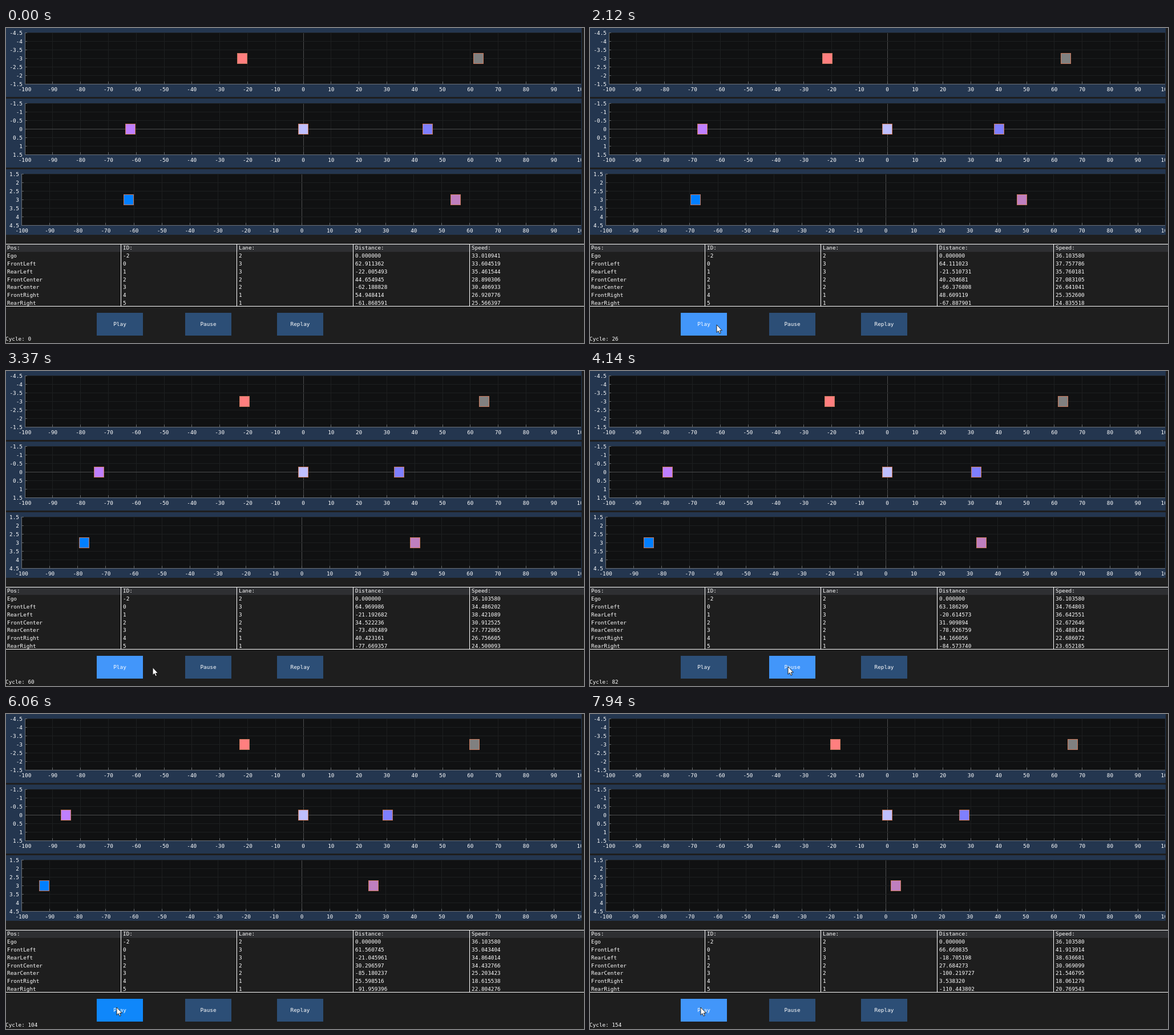
Animation of 1013 by 553 pixels, one loop 8 s. Source, as an HTML page with a canvas:

```html
<!DOCTYPE html>
<html lang="en">
<head>
<meta charset="utf-8">
<title>Lane monitor</title>
<style>
  html, body { margin: 0; width: 100%; height: 100%; overflow: hidden; background: #1e1e1e; }
  canvas { display: block; }
</style>
</head>
<body>
<canvas id="stage" width="1013" height="553"></canvas>
<script>
const ctx = document.getElementById('stage').getContext('2d');
const W = 1013, H = 553, LOOP = 8000, STEP = 70, RIGHT = 1008;

const ANCHORS = [590, 1420, 2260, 3090, 3930, 4780, 5650, 6060, 6470, 7310];

// [time, cycle]
const CYCLES = [[1180, 0], [2120, 26], [3370, 60], [4920, 104], [6190, 104], [7100, 130], [7940, 154]];

// [time, x, y]
const POINTER = [[520, 280, 560], [1000, 222, 521], [3225, 222, 521], [3640, 347, 519], [5650, 347, 519], [5950, 194, 515]];
const PRESSES = [[1050, 1190], [4780, 4900], [6060, 6190]];

const BUTTONS = [['Play', 159], ['Pause', 314], ['Replay', 475]];
const COLUMNS = [['Pos:', 2], ['ID:', 205], ['Lane:', 408], ['Distance:', 612], ['Speed:', 816]];

const PLOTS = [
  { top: 0, bottom: 121, y: 8, left: 33, zero: 521, unit: 4.88, first: -4.5 },
  { top: 124, bottom: 245, y: 132, left: 33, zero: 521, unit: 4.88, first: -1.5 },
  { top: 248, bottom: 363, y: 256, left: 27, zero: 518.5, unit: 4.908, first: 1.5 }
];

// Samples of distance and speed at these cycles
const KNOTS = [0, 26, 60, 104, 130, 154];
const CARS = [
  { pos: 'Ego', id: -2, lane: 2, color: '#bfbfff',
    dist: [0, 0, 0, 0, 0, 0],
    speed: [33.010941, 36.10358, 36.10358, 36.10358, 36.10358, 36.10358] },
  { pos: 'FrontLeft', id: 0, lane: 3, color: '#808080',
    dist: [62.911362, 64.111023, 64.969986, 61.560745, 63.367867, 66.660835],
    speed: [33.604519, 37.757786, 34.486202, 35.043404, 41.36982, 41.913914] },
  { pos: 'RearLeft', id: 1, lane: 3, color: '#ff7f7f',
    dist: [-22.005493, -21.510731, -21.192682, -21.045961, -20.264399, -18.705198],
    speed: [35.461544, 35.760181, 38.421089, 34.864014, 38.791008, 38.636681] },
  { pos: 'FrontCenter', id: 2, lane: 2, color: '#7f7fff',
    dist: [44.654945, 40.204681, 34.522236, 30.296597, 29.4676, 27.684273],
    speed: [28.890306, 27.083105, 30.912525, 34.432766, 33.948032, 30.969099] },
  { pos: 'RearCenter', id: 3, lane: 2, color: '#bf7fff',
    dist: [-62.188828, -66.376808, -73.402489, -85.180237, -92.164948, -100.219727],
    speed: [30.406933, 26.641041, 27.772865, 25.203423, 25.124304, 21.546795] },
  { pos: 'FrontRight', id: 4, lane: 1, color: '#bf7fbf',
    dist: [54.948414, 48.609119, 40.423161, 25.598516, 14.43735, 3.53832],
    speed: [26.920776, 25.3526, 26.756605, 18.615538, 18.675219, 18.06127] },
  { pos: 'RearRight', id: 5, lane: 1, color: '#007fff',
    dist: [-61.868591, -67.887901, -77.669357, -91.959396, -101.80574, -110.443802],
    speed: [25.566397, 24.835518, 24.500093, 22.804276, 21.052591, 20.769543] }
];

const lerp = (a, b, u) => a + (b - a) * u;
const smooth = u => u * u * (3 - 2 * u);

// Index of the segment holding v, and the place within it
function locate(stops, v) {
  let i = 0;
  while (i < stops.length - 2 && v >= stops[i + 1]) i++;
  const u = (v - stops[i]) / (stops[i + 1] - stops[i]);
  return [i, Math.min(1, Math.max(0, u))];
}

function snap(t) {
  let base = 0;
  for (const a of ANCHORS) if (t >= a) base = a;
  return base ? base + Math.floor((t - base) / STEP) * STEP : 0;
}

function cycleAt(t) {
  const [i, u] = locate(CYCLES.map(k => k[0]), t);
  return Math.round(lerp(CYCLES[i][1], CYCLES[i + 1][1], u));
}

function pointerAt(t) {
  const [i, u] = locate(POINTER.map(k => k[0]), t);
  const a = POINTER[i], b = POINTER[i + 1], s = smooth(u);
  return [lerp(a[1], b[1], s), lerp(a[2], b[2], s)];
}

// Distance follows the speed relative to the ego car.
function carState(car, cycle) {
  const [i, u] = locate(KNOTS, cycle), span = KNOTS[i + 1] - KNOTS[i];
  const slope = k => (car.speed[k] - CARS[0].speed[k]) * 0.0258 * span;
  const w = 1 - u;
  const dist = lerp(car.dist[i], car.dist[i + 1], smooth(u)) +
    slope(i) * u * w * w - slope(i + 1) * u * u * w;
  return { dist, speed: lerp(car.speed[i], car.speed[i + 1], u) };
}

function rect(x, y, w, h, color) {
  ctx.fillStyle = color;
  ctx.fillRect(x, y, w, h);
}

// y is the middle of the line
function text(s, x, y, align = 'left') {
  ctx.fillStyle = '#fff';
  ctx.textAlign = align;
  ctx.fillText(s, x, y + 3.4);
}

function clipTo(x, y, w, h, draw) {
  ctx.save();
  ctx.beginPath();
  ctx.rect(x, y, w, h);
  ctx.clip();
  draw();
  ctx.restore();
}

function drawPlot(p, cars) {
  const width = RIGHT - p.left, base = p.y + 90;
  const toX = d => p.zero + d * p.unit;
  rect(0, p.top, RIGHT + 1, p.bottom - p.top, '#24364f');
  rect(p.left, p.y, width, 90, '#101112');

  clipTo(0, p.top, RIGHT, p.bottom - p.top, () => {
    for (let v = -100; v <= 100; v += 10) {
      const x = Math.floor(toX(v));
      rect(x, p.y, 1, 90, v ? '#1d1f20' : '#4c4d4e');
      rect(x, base - 4, 1, 4, '#66696c');
      text(v, toX(v), p.y + 100, 'center');
    }
  });
  for (let i = 0; i <= 6; i++) {
    const v = p.first + i / 2, y = p.y + i * 15;
    rect(p.left, y, width, 1, v ? '#1d1f20' : '#4c4d4e');
    rect(p.left, y, 4, 1, '#66696c');
    text(v, p.left - 4, y + 0.5, 'right');
  }
  rect(p.left, p.y, 1, 91, '#6b7077');
  rect(p.left, base, width, 1, '#6b7077');

  clipTo(p.left, p.y, width, 90, () => {
    for (const car of cars) {
      if (car.dist < -100) continue;
      const x = Math.round(toX(car.dist) - 9), y = p.y + 36;
      rect(x, y, 18, 19, '#c9785a');
      rect(x + 1, y + 1, 16, 17, car.color);
    }
  });
}

function drawTable(cars) {
  rect(0, 380, W, 13, '#2e2f32');
  COLUMNS.forEach(([name, x], i) => {
    text(name, x, 386);
    if (i) rect(x - 4, 379, 1, 110, '#fff');
  });
  rect(0, 379, W, 1, '#fff');
  rect(0, 488, W, 1, '#fff');
  cars.forEach((car, row) => {
    const cells = [car.pos, car.id, car.lane, car.dist.toFixed(6), car.speed.toFixed(6)];
    cells.forEach((s, i) => text(s, COLUMNS[i][1], 400 + row * 13.7));
  });
}

function drawButtons(t) {
  const [px, py] = pointerAt(t - STEP);
  const pressed = PRESSES.some(([a, b]) => t >= a && t < b);
  for (const [name, x] of BUTTONS) {
    const over = px >= x && px < x + 81 && py >= 500 && py < 540;
    rect(x, 500, 81, 40, over ? (pressed ? '#0f87fa' : '#4296fa') : '#2c4e76');
    text(name, x + 40.5, 520, 'center');
  }
}

function drawPointer(t) {
  const [x, y] = pointerAt(t);
  ctx.save();
  ctx.translate(x, y);
  const arrow = new Path2D('M0 0V13.5L3 10.7L5 15.3L7.2 14.4L5.3 10H9.4Z');
  ctx.fillStyle = '#fff';
  ctx.fill(arrow);
  ctx.strokeStyle = '#111';
  ctx.lineWidth = 0.9;
  ctx.stroke(arrow);
  ctx.restore();
}

function draw(time) {
  const t = snap(time), cycle = cycleAt(t);
  const cars = CARS.map(car => ({ ...car, ...carState(car, cycle) }));
  ctx.font = '9.37px "DejaVu Sans Mono", monospace';
  rect(0, 0, W, H, '#1e1e1e');
  PLOTS.forEach((p, i) => drawPlot(p, cars.filter(car => car.lane === 3 - i)));
  drawTable(cars);
  drawButtons(t);
  text('Cycle: ' + cycle, -1, 546);
  drawPointer(t);
}

const start = performance.now();
function tick() {
  draw((performance.now() - start) % LOOP);
  requestAnimationFrame(tick);
}
tick();
</script>
</body>
</html>
```
